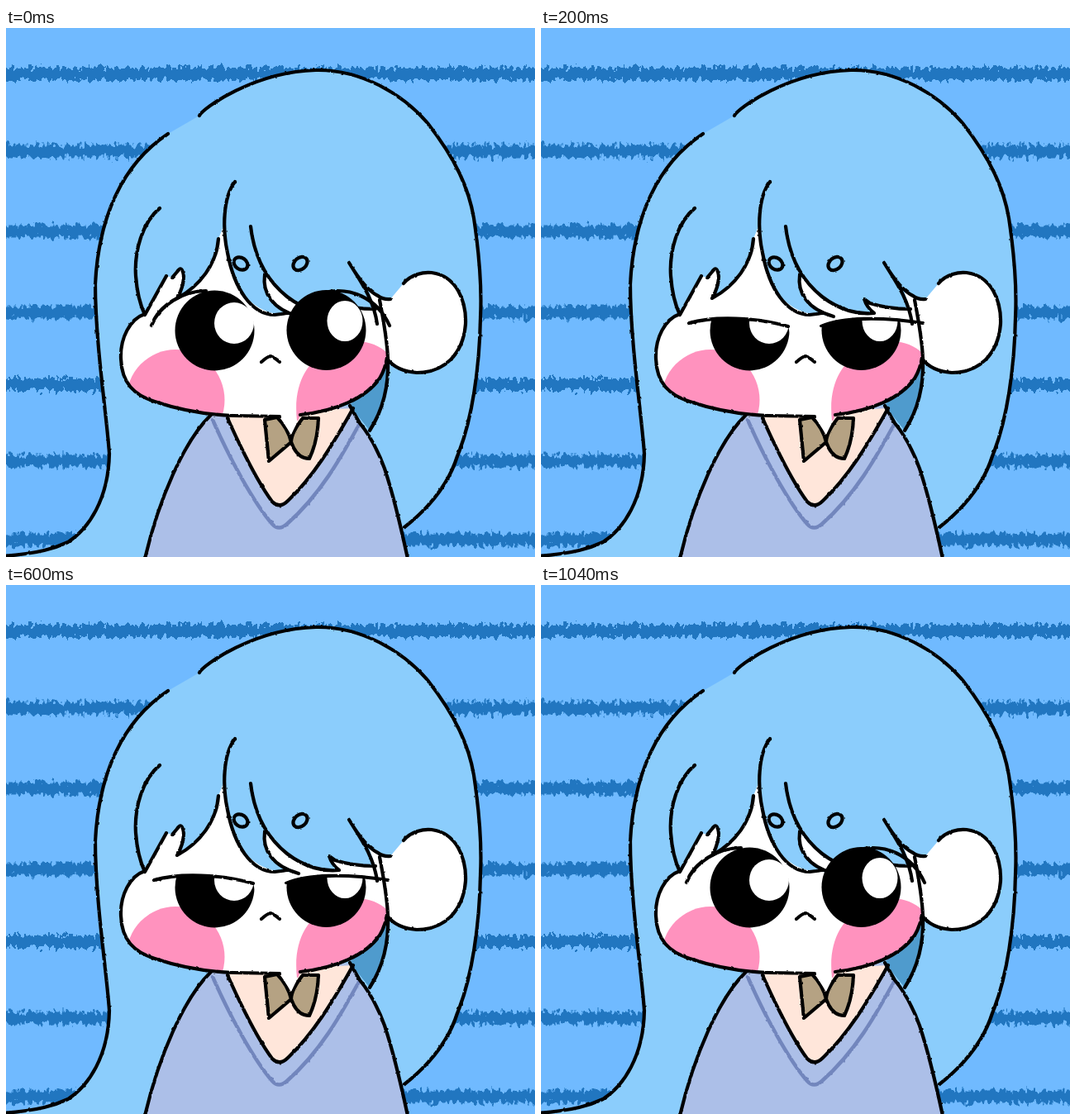
These frames come from a looping animation (640x640 px, 1.2 s). An HTML page without scripts:

```html
<!DOCTYPE html>
<html lang="en">
<head>
<meta charset="utf-8">
<title>Blinking girl</title>
<style>
  html, body { margin: 0; width: 100%; height: 100%; overflow: hidden; background: #70baff; }
  svg { display: block; width: 100%; height: 100%; }
  .ink { fill: none; stroke: #000; stroke-width: 4.2; stroke-linecap: round; stroke-linejoin: round; }
  .white { fill: #fff; }
  .hair { fill: #8bcdfc; }
  .pink { fill: #ff92be; }
  .eyes { visibility: hidden; animation: 1200ms step-end infinite; }
  .open { animation-name: open; }
  .half { animation-name: half; }
  .shut { animation-name: shut; }
  @keyframes open {
    0%, 66.667% { visibility: visible; }
    16.667%, 100% { visibility: hidden; }
  }
  @keyframes half {
    0%, 33.333%, 66.667%, 100% { visibility: hidden; }
    16.667%, 50% { visibility: visible; }
  }
  @keyframes shut {
    0%, 50%, 100% { visibility: hidden; }
    33.333% { visibility: visible; }
  }
</style>
</head>
<body>
<svg viewBox="0 0 640 640">
  <defs>
    <filter id="chalk" filterUnits="userSpaceOnUse" x="-20" y="0" width="680" height="640" color-interpolation-filters="sRGB">
      <feTurbulence type="fractalNoise" baseFrequency=".22 .12" numOctaves="2" seed="4"/>
      <feDisplacementMap in="SourceGraphic" scale="17" xChannelSelector="R" yChannelSelector="G"/>
    </filter>
    <filter id="pen" filterUnits="userSpaceOnUse" x="-10" y="0" width="660" height="650" color-interpolation-filters="sRGB">
      <feTurbulence type="fractalNoise" baseFrequency=".2" numOctaves="1" seed="7"/>
      <feDisplacementMap in="SourceGraphic" scale="2.5" xChannelSelector="R" yChannelSelector="G"/>
    </filter>

    <path id="face" d="M168 346 C150 352 138 375 139 400 C140 430 155 444 180 452 C210 462 245 468 275 469 L331 470 L345 492 L356 469
      C400 463 435 448 452 424 Q459 412 461 399 L463 345 L452 329 L440 320 L447 340 Q420 339 398 333 L391 328 Q394 338 403 345
      C385 347 362 342 340 325 Q324 313 313 299 C310 320 322 340 354 349 L340 347 C297 347 276 315 268 272 Q264 258 263 240
      L257 255 C255 285 235 312 207 327 Q215 313 215 300 Q213 286 207 295 L201 302 L194 300 Q183 320 168 346Z"/>
    <clipPath id="inFace"><use href="#face"/></clipPath>
    <clipPath id="underLids">
      <path d="M179 357 C210 348 260 350 299 361 L320 440 H170Z M339 361 C365 350 410 349 462 357 V440 H330Z"/>
    </clipPath>
    <g id="eyeballs">
      <ellipse cx="252.500" cy="366" rx="48" ry="48.500"/>
      <ellipse cx="387.500" cy="365.500" rx="48" ry="48.500"/>
      <g class="white">
        <ellipse cx="276" cy="357" rx="24" ry="25"/>
        <ellipse cx="410" cy="354.500" rx="21.500" ry="24.500"/>
      </g>
    </g>
  </defs>

  <rect width="640" height="640" fill="#70baff"/>
  <path filter="url(#chalk)" fill="none" stroke="#2176c0" stroke-width="15"
    d="M-15 55.500H655 M-15 149H655 M-15 246H655 M-15 344H655 M-15 431.500H655 M-15 524H655 M-15 619H655"/>

  <!-- Hair and body -->
  <path class="hair" d="M0 640 V638 C40 636 60 629 75 622 C100 606 124 570 125 515 C122 470 108 380 108 310 C112 230 140 165 196 128
    L234 106 C238 97 300 53 375 51 C430 50 480 80 510 115 C545 160 560 195 566 230 C572 270 576 310 574 350
    C573 410 564 475 546 518 C536 550 515 578 482 604 L470 640Z"/>
  <path fill="#4f9bcd" d="M461 398 Q467 445 440 487 L416 457Z"/>
  <path fill="#acbfe8" d="M248 468 C215 500 185 570 168 640 H486 C477 600 467 560 458 533 Q446 500 428 478 L416 457Z"/>
  <path fill="#ffe6da" d="M268 468 C285 510 305 550 322 573 Q331 582 341 572 C370 545 395 505 420 460Z"/>
  <path fill="none" stroke="#7286bd" stroke-width="4.500" stroke-linecap="round" filter="url(#pen)"
    d="M250 474 C270 520 300 575 322 600 Q330 609 340 600 C380 565 405 520 427 480"/>
  <path class="ink" style="fill:#b5a283" filter="url(#pen)"
    d="M313 474 L318 524 L345 501 Q341 484 328 471Z M359 472 Q345 490 345 501 Q352 521 367 521 Q377 500 378 472Z"/>

  <!-- Face and ear -->
  <path class="white" d="M440 320 L465 328 L481 309 C490 298 505 295 515 296 C545 300 557 330 556 358 C553 395 530 417 497 417 Q472 415 461 400 L447 340Z"/>
  <use href="#face" class="white"/>
  <g class="pink" clip-path="url(#inFace)">
    <ellipse cx="205" cy="450" rx="59.500" ry="61"/>
    <path d="M352 475 C347 430 365 405 385 393 C410 377 442 372 465 397 V475Z"/>
  </g>

  <g class="ink" filter="url(#pen)">
    <path d="M-5 639 C40 636 60 629 75 622 C100 606 124 570 125 515 C122 470 108 380 108 310 C112 230 140 165 196 128"/>
    <path d="M234 106 C238 97 300 53 375 51 C430 50 480 80 510 115 C545 160 560 195 566 230 C572 270 576 310 574 350
      C573 410 564 475 546 518 C536 550 515 578 482 604"/>
    <path d="M248 468 C215 500 185 570 168 642 M416 457 L428 478 Q446 500 458 533 C467 560 477 600 486 642"/>
    <path d="M268 472 C285 510 305 550 322 573 Q331 582 341 572 C370 545 395 505 420 460"/>
    <path d="M168 346 C150 352 138 375 139 400 C140 430 155 444 180 452 C210 462 245 468 275 469 L331 470
      M356 468 C400 463 435 448 452 424 Q459 412 461 399"/>
    <path d="M481 309 C490 298 505 295 515 296 C545 300 557 330 556 358 C553 395 530 417 497 417 Q472 415 461 400"/>
    <path d="M452 329 C456 350 461 375 462 400 Q464 450 440 487"/>
    <path d="M186 218 C165 235 155 270 157 300 Q159 328 168 347 Q183 320 194 300"/>
    <path d="M201 302 L207 295 Q213 286 215 300 Q215 313 207 327 C235 312 255 285 257 255"/>
    <path d="M277 186 C262 205 262 245 268 272 C276 315 297 347 325 347 L341 345"/>
    <path d="M296 240 C300 275 315 305 340 325 C362 342 385 347 403 345 Q394 338 391 328 L398 333 Q420 340 447 340"/>
    <path d="M313 299 C310 320 322 340 354 349"/>
    <path d="M415 284 C428 305 445 328 449 358 M415 284 Q435 317 450 324 Q457 329 465 328"/>
    <ellipse cx="284" cy="285" rx="9" ry="7" transform="rotate(35 284 285)"/>
    <ellipse cx="356" cy="285" rx="9.500" ry="7" transform="rotate(-40 356 285)"/>
    <path d="M309 404 Q317 397 320 397 Q324 398 331 404"/>
  </g>

  <!-- Blink poses -->
  <g class="eyes open">
    <use href="#eyeballs"/>
    <path class="ink" filter="url(#pen)" d="M176 360 C185 335 215 318 242 318 M385 320 C415 313 448 325 464 360"/>
  </g>
  <g class="eyes half">
    <use href="#eyeballs" clip-path="url(#underLids)"/>
    <path class="ink" filter="url(#pen)" d="M179 357 C210 348 260 350 299 361 M339 361 C365 350 410 349 462 357"/>
  </g>
  <g class="eyes shut">
    <path class="ink" filter="url(#pen)" d="M182 380 C205 412 270 415 294 387 M347 387 C372 412 430 412 457 380"/>
  </g>
</svg>
</body>
</html>
```
